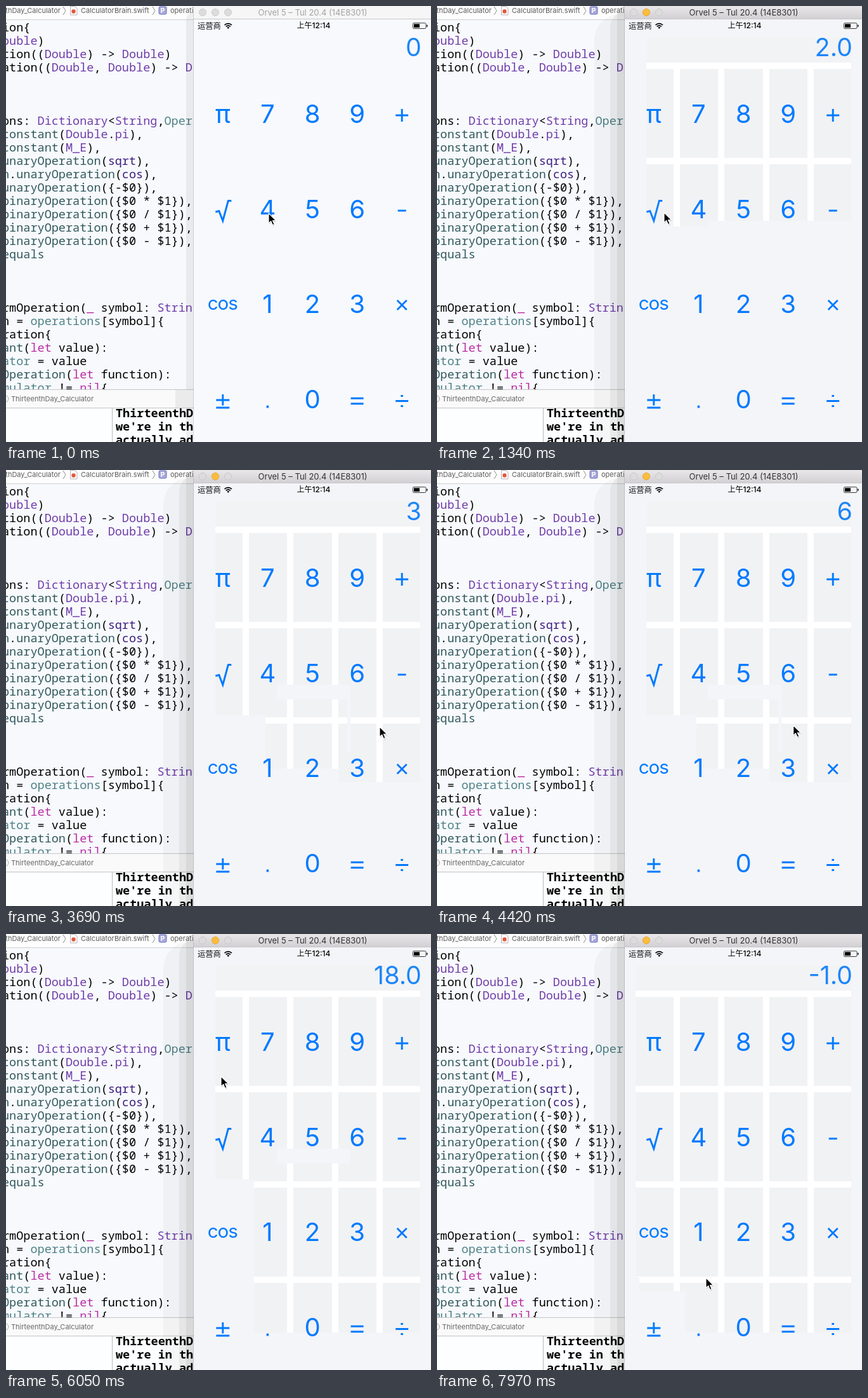
Animation of 670 by 686 pixels, one loop 8000 ms. Source, as an HTML page:

```html
<!DOCTYPE html>
<html lang="en">
<head>
<meta charset="utf-8">
<title>Calculator</title>
<style>
html, body { margin: 0; width: 100%; height: 100%; overflow: hidden; background: #f7f9fc; }
svg { display: block; width: 670px; height: 686px; }
text { white-space: pre; }
.code { font: 500 18.53px "Noto Sans Mono", "DejaVu Sans Mono", monospace; }
.bold { font-weight: 700; }
.ui { font-family: Inter, "Noto Sans CJK SC", "Noto Sans CJK", sans-serif; }
</style>
</head>
<body>
<svg id="stage" viewBox="0 0 670 686"></svg>
<script>
const NS = "http://www.w3.org/2000/svg";
const stage = document.getElementById("stage");
const LOOP = 8000, STEP = 147.4;
const BLUE = "#007aff", FLAT = "#f4f5f8";

function add(parent, tag, attrs = {}, content) {
  const el = document.createElementNS(NS, tag);
  for (const key in attrs) el.setAttribute(key, attrs[key]);
  if (content !== undefined) el.textContent = content;
  parent.appendChild(el);
  return el;
}
const box = (p, x1, y1, x2, y2, fill, more) =>
  add(p, "rect", { x: x1, y: y1, width: x2 - x1, height: y2 - y1, fill, ...more });
const label = (p, x, y, size, fill, str, more) =>
  add(p, "text", { class: "ui", x, y, "font-size": size, fill, ...more }, str);
const line = (p, d, stroke, width, more) =>
  add(p, "path", { d, stroke, "stroke-width": width, fill: "none", ...more });
const show = (el, on) => el.setAttribute("display", on ? "inline" : "none");

// ---- Editor ----
// Markup: {letter|text} picks a colour, everything else is black.
const INK = { t: "#703daa", f: "#31595d", v: "#4f8187", k: "#bb2ca2", s: "#3d1d81" };
const binary = op => `{f|binaryOperation}({$0 ${op} $1}),`;
const code = [
  [0, "ion{"],
  [1, "{t|ouble})"],
  [2, "tion(({t|Double}) -> {t|Double})"],
  [3, "ation(({t|Double}, {t|Double}) -> {t|D}"],
  [7, "ons: {t|Dictionary}<{t|String},{v|Oper}"],
  [8, "{f|constant}({t|Double}.{t|pi}),"],
  [9, "{f|constant}({t|M_E}),"],
  [10, "{f|unaryOperation}({s|sqrt}),"],
  [11, "{f|n}.{f|unaryOperation}({s|cos}),"],
  [12, "{f|unaryOperation}({-$0}),"],
  [13, binary("*")], [14, binary("/")], [15, binary("+")], [16, binary("-")],
  [17, "{f|equals}"],
  [21, "rmOperation({k|_} symbol: {t|Strin}"],
  [22, "n = {v|operations}[symbol]{"],
  [23, "ration{"],
  [24, "{f|ant}({k|let} value):"],
  [25, "{v|ator} = value"],
  [26, "{f|Operation}({k|let} function):"],
  [27, "{v|mulator} != {k|nil}{"]
];
const editor = add(stage, "g");
box(editor, 0, 0, 296, 686, "#f7f9fc");
for (const [row, src] of code) {
  const t = add(editor, "text", { class: "code", x: -6, y: 40 + 21 * row });
  for (const part of src.match(/\{[tfvks]\|[^}]*\}|[^{]+|\{/g)) {
    const m = part.match(/^\{(\w)\|(.*)\}$/);
    add(t, "tspan", { fill: m ? INK[m[1]] : "#000" }, m ? m[2] : part);
  }
}
box(editor, 0, 0, 296, 21, "#fdfdfd");
box(editor, 0, 21, 296, 22, "#cfd0d2");
const crumb = (x, str, more) => label(editor, x, 11, 11, "#5c5c5e", str, more);
const chevron = x => line(editor, `M${x} 1l4 6.5l-4 6.5`, "#8a8a8c", 1);
crumb(86, "thDay_Calculator", { "text-anchor": "end" });
chevron(90);
line(editor, "M101.5 .5h7l3.500 3.500v10h-10.500z", "#b4b4b6", 1, { fill: "#fff" });
add(editor, "circle", { cx: 106.5, cy: 8.5, r: 3.2, fill: "#e8573f" });
crumb(118, "CalculatorBrain.swift");
chevron(231);
box(editor, 241, 1, 253, 13, "#a9a9dc", { rx: 2, stroke: "#6f6fbd" });
label(editor, 247, 11, 10, "#fff", "P", { "text-anchor": "middle", "font-weight": 700 });
crumb(259, "operations");

box(editor, 0, 603, 296, 633, "#fafafb");
box(editor, 0, 603, 296, 604, "#c4c5c8");
box(editor, 0, 632, 296, 686, "#fdfeff");
box(editor, 0, 632, 296, 633, "#c4c5c8");
box(editor, 167, 633, 168, 686, "#b8b9bb");
add(editor, "circle", { cx: -1, cy: 618, r: 5, fill: "none", stroke: "#a5a5a7" });
label(editor, 8, 622, 11, "#666668", "ThirteenthDay_Calculator");
["ThirteenthD", "we're in th", "actually ad"].forEach((s, i) =>
  add(editor, "text", { class: "code bold", x: 173, y: 647 + 21 * i }, s));

// Banded window shadow
const shade = (p, x, y, r, a) =>
  box(p, x, y, x + 400, 760, "#000", { rx: r, "fill-opacity": a });
const softShade = add(stage, "g"), deepShade = add(stage, "g");
shade(softShade, 284, 8, 14, .06);
box(softShade, 267, 604, 284, 632, "#000", { "fill-opacity": .06 });
shade(deepShade, 248, 12, 42, .03);
shade(deepShade, 273, 8, 26, .05);
shade(deepShade, 284, 0, 14, .06);
box(stage, 295, 0, 296, 686, "#000", { "fill-opacity": .12 });

// ---- Simulator window ----
const grad = add(add(stage, "defs"), "linearGradient", { id: "bar", x1: 0, y1: 0, x2: 0, y2: 1 });
add(grad, "stop", { offset: 0, "stop-color": "#e9e7e9" });
add(grad, "stop", { offset: 1, "stop-color": "#d2d0d2" });

const phone = add(stage, "g");
const titleBar = box(phone, 296, 0, 670, 20, "#f6f6f6");
box(phone, 296, 20, 670, 21, "#c9c8ca");
const lights = [310, 330, 350].map(cx =>
  add(phone, "circle", { cx, cy: 10, r: 5.6, fill: "#dcdcdc", stroke: "#c6c6c6", "stroke-width": .8 }));
const title = label(phone, 483.5, 14.5, 13, "#333", "Orvel 5 – Tul 20.4 (14E8301)", { "text-anchor": "middle" });
const screen = box(phone, 296, 21, 670, 686, FLAT);

// Key grid, uncovered piece by piece: [step, x1, y1, x2, y2]
const reveals = [
  [3, 402, 50, 653, 338], [5, 373, 320, 428, 347], [8, 330, 50, 653, 338],
  [10, 330, 338, 427, 386], [11, 409, 361, 538, 470], [17, 543, 338, 653, 491],
  [17, 524, 445, 653, 491], [34, 543, 491, 653, 627], [36, 391, 361, 653, 627],
  [43, 313, 50, 653, 338], [43, 313, 338, 427, 389], [51, 313, 50, 653, 540],
  [52, 319, 540, 391, 562]
];
const clip = add(add(stage, "defs"), "clipPath", { id: "seen" });
const windows = reveals.map(([from, ...r]) => ({ from, el: box(clip, ...r, "#000") }));
const grid = add(phone, "g", { "clip-path": "url(#seen)" });
box(grid, 296, 50, 670, 686, "#fff");
box(grid, 313, 50, 654, 89, "#f2f3f5");
for (let r = 0; r < 4; r++)
  for (let c = 0; c < 5; c++) {
    const x = 312.6 + 70.4 * c, y = 99 + 150 * r;
    box(grid, Math.round(x), y, Math.round(x + 60.4), y + 140, "#f1f2f4");
  }
const sliver = box(phone, 538, 361, 543, 445, FLAT);
const patch = box(phone, 427, 338, 543, 361, FLAT);

// Status bar
label(phone, 302, 35.5, 12.3, "#111", "运营商");
label(phone, 485, 35.3, 12, "#000", "上午12:14", { "text-anchor": "middle", "font-weight": 500 });
line(phone, "M344.500 30a8.200 8.200 0 0 1 11.500 0M346.700 32.300a5 5 0 0 1 7.100 0", "#000", 1.7);
add(phone, "path", { d: "M350.250 36l-2-2.200a3 3 0 0 1 4 0z" });
box(phone, 641.5, 26.8, 662, 35.5, "none", { rx: 1.6, stroke: "#222", "stroke-width": .9 });
box(phone, 643, 28.3, 652, 34, "#000");
box(phone, 663, 29.5, 664.6, 33, "#222", { rx: .7 });

const readout = label(phone, 655, 79.3, 39.5, "#1d86f9", "0", { "text-anchor": "end" });

// ---- Keys ----
const shapes = {
  "+": "M-10 2h20M0-8v20", "-": "M-6.500 2h13", "×": "M-7.500-6l15 15M7.500-6l-15 15",
  "=": "M-10-1.700h20M-10 6.700h20", "÷": "M-10 2.500h20M-1.800-5.500h3.600M-1.800 10.500h3.600",
  "±": "M-10.500 1h21M0-8v17.500M-10.500 13h21", ".": "M-1.800 11.500h3.600",
  "√": "M-11.500 4l5.500-1.500l6 15.500l8.500-31.500h5"
};
const keys = {};
["π789+", "√456-", "c123×", "±.0=÷"].forEach((row, r) => [...row].forEach((ch, c) => {
  const x = 341.8 + 70.6 * c, y = 170 + Math.floor(149.7 * r + .4);
  const g = add(phone, "g", { transform: `translate(${x} ${y})` });
  if (shapes[ch]) line(g, shapes[ch], BLUE, ch === "." ? 3.8 : 2.9);
  else if (ch === "c") label(g, -.5, 9, 29.5, BLUE, "cos", { "text-anchor": "middle", "letter-spacing": -1 });
  else label(g, 0, 14.2, 40, BLUE, ch, { "text-anchor": "middle" });
  keys[ch] = g;
}));

// ---- Pointer ----
const pointer = add(stage, "g");
const arrow = "M0 0v16l3.700-3.500l2.600 6l2.700-1.100l-2.600-5.900h5.100z";
add(pointer, "path", { d: arrow, fill: "#000", "fill-opacity": .18, transform: "translate(.8 1.8)" });
add(pointer, "path", { d: arrow, fill: "#000", stroke: "#fff", "stroke-width": 1.1, "stroke-linejoin": "round" });

const path = [
  [0, 414, 326], [3, 414, 326], [6, 358, 325], [9, 358, 325], [10, 395, 366], [11, 525, 450],
  [12, 525, 450], [16, 549, 463], [19, 549, 463], [20, 617, 460], [23, 617, 460],
  [25, 589, 404], [27, 556, 342], [29, 556, 342], [33, 579, 581], [35, 579, 581],
  [37, 393, 367], [38, 361, 299], [39, 361, 299], [40, 345, 240], [41, 339, 224],
  [44, 339, 224], [46, 380, 491], [47, 380, 491], [49, 347, 493], [52, 347, 493], [54, 424, 541]
];
const presses = [
  [2, "4", "4"], [7.2, "√", "2.0"], [17, "3", "3"], [22, "×", "3"], [28, "6", "6"],
  [34, "=", "18.0"], [43, "π", "3.14159265358…"], [51, "c", "-1.0"]
];

function pointerAt(k) {
  const i = path.findIndex(p => p[0] >= k);
  if (i <= 0) return path[i ? path.length - 1 : 0].slice(1);
  const [k0, x0, y0] = path[i - 1], [k1, x1, y1] = path[i];
  const u = (k - k0) / (k1 - k0);
  return [x0 + (x1 - x0) * u, y0 + (y1 - y0) * u];
}

function draw(ms) {
  const k = Math.floor(ms / STEP + .03);
  const active = k >= 1;
  show(softShade, !active);
  show(deepShade, active);
  titleBar.setAttribute("fill", active ? "url(#bar)" : "#f6f6f6");
  title.setAttribute("fill", active ? "#333" : "#a3a3a3");
  lights[1].setAttribute("fill", active ? "#fdbc40" : "#dcdcdc");
  lights[1].setAttribute("stroke", active ? "#dfa023" : "#c6c6c6");
  screen.setAttribute("fill", active ? FLAT : "#f7f9fc");

  for (const w of windows) show(w.el, k >= w.from);
  show(sliver, k >= 11 && k < 36);
  show(patch, k >= 11 && k < 51);

  let value = "0";
  for (const [at, key, result] of presses) {
    const since = k - at;
    if (since >= 0) value = result;
    keys[key].setAttribute("opacity", since < 0 ? 1 : Math.min(1, .22 + .4 * since));
  }
  readout.textContent = value;
  pointer.setAttribute("transform", `translate(${pointerAt(k)})`);
}

function tick() {
  draw(performance.now() % LOOP);
  requestAnimationFrame(tick);
}
tick();
</script>
</body>
</html>
```
